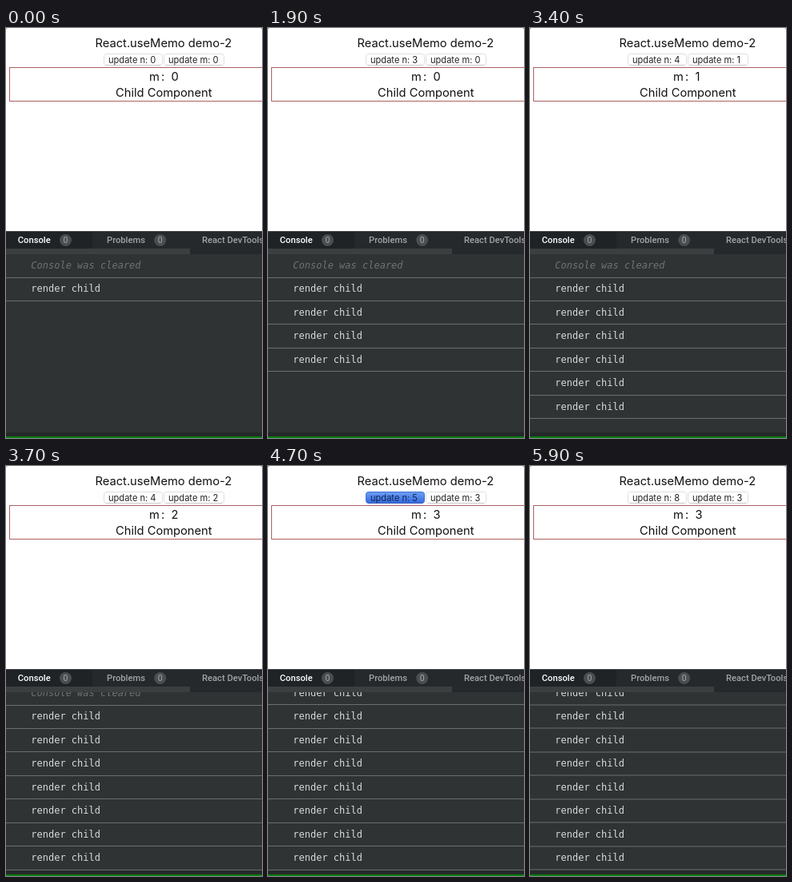
Animation, 320 px wide and 513 px high, one loop 6000 ms. Source, as an HTML page:

```html
<!DOCTYPE html>
<html lang="en">
<head>
<meta charset="utf-8">
<title>useMemo demo</title>
<style>
  html, body { margin: 0; height: 100%; overflow: hidden; background: #fff; }
  svg { display: block; width: 100vw; height: 100vh; }
  text { white-space: pre; }
  .page { font: 14.7px Inter, sans-serif; fill: #111; }
  .button rect { fill: #fff; stroke: #dedede; }
  .button text { font: 11.1px Inter, sans-serif; fill: #222; }
  .button .shade { fill: none; stroke: #c9c9c9; }
  .pressed rect { fill: url(#blue); stroke: #3d6fd0; }
  .pressed text { fill: #10264f; }
  .pressed .shade { stroke: #2f5cb5; }
  .tab { font: 500 11.2px Roboto, sans-serif; fill: #a3a5a6; }
  .tab.active { fill: #fff; }
  .badge { font: 10.5px Roboto, sans-serif; fill: #a5a7a8; text-anchor: middle; }
  .log { font: 12px "DejaVu Sans Mono", monospace; fill: #d9dbdb; }
  .log .cleared { font-style: italic; fill: #707374; }
  .log path { stroke: #6b6e6f; }
</style>
</head>
<body>
<svg viewBox="0 0 320 513" preserveAspectRatio="none">
  <defs>
    <linearGradient id="blue" x2="0" y2="1">
      <stop stop-color="#6c9ff5"/><stop offset="1" stop-color="#3569e0"/>
    </linearGradient>
    <clipPath id="view"><rect y="283" width="320" height="223"/></clipPath>
  </defs>

  <rect width="320" height="20" fill="#aaa"/>
  <rect width="320" height="260" rx="3" fill="#fff"/>
  <g class="page">
    <text x="111.5" y="23.5">React.useMemo demo-2</text>
    <text x="179" y="66">m</text>
    <text x="194" y="66">:</text>
    <text x="206.5" y="66" id="value">0</text>
    <text x="137" y="86">Child Component</text>
  </g>
  <g class="button" id="n">
    <rect x="122.5" y="32.5" width="73" height="14" rx="3"/>
    <path class="shade" d="M125 46.5h68"/>
    <text x="128" y="43.7"></text>
  </g>
  <g class="button" id="m">
    <rect x="197.5" y="32.5" width="75" height="14" rx="3"/>
    <path class="shade" d="M200 46.5h70"/>
    <text x="203" y="43.7"></text>
  </g>
  <rect x="4.5" y="49.5" width="330" height="42" fill="none" stroke="#ad6060"/>

  <rect y="254" width="320" height="259" fill="#2f3334"/>
  <rect y="254" width="320" height="29" fill="#25292c"/>
  <rect y="254" width="108" height="22" fill="#1f2326"/>
  <rect y="254" width="320" height="1" fill="#45494a"/>
  <rect y="276" width="230" height="7" fill="#3b3f40"/>
  <text class="tab active" x="14.8" y="269.3">Console</text>
  <text class="tab" x="126" y="269.3">Problems</text>
  <text class="tab" x="245" y="269.3">React DevTools</text>
  <g fill="#4a4e50"><circle cx="74.5" cy="265.5" r="7.5"/><circle cx="192.7" cy="265.5" r="7.5"/></g>
  <text class="badge" x="74.5" y="269.2">0</text>
  <text class="badge" x="192.7" y="269.2">0</text>

  <g clip-path="url(#view)">
    <g class="log" id="log">
      <text class="cleared" x="31.3" y="301.3">Console was cleared</text>
      <path d="M0 312.5h320"/>
    </g>
  </g>
  <rect y="506" width="320" height="5" fill="#25292a"/>
  <rect y="511" width="320" height="2" fill="#0b7d12"/>
</svg>
<script>
const LOOP = 6000, PRESS = 100, ROW = 29.5, FITTING = 7, FIRST_SCROLL = 13;
const clicks = [
  [1400, 'n'], [1600, 'n'], [1800, 'n'], [2200, 'n'],
  [3200, 'm'], [3500, 'm'], [4000, 'm'],
  [4700, 'n'], [5100, 'n'], [5300, 'n'], [5500, 'n']
];
const get = id => document.getElementById(id);
const log = get('log');

const rows = Array.from({ length: clicks.length + 1 }, (_, i) => {
  const row = document.createElementNS('http://www.w3.org/2000/svg', 'g');
  const y = 330.3 + i * ROW;
  row.innerHTML = `<text x="31.3" y="${y}">render child</text>
    <path d="M0 ${Math.floor(341 + i * ROW) + 0.5}h320"/>`;
  return log.appendChild(row);
});

function draw(now) {
  const t = now % LOOP;
  const past = clicks.filter(([at]) => at <= t);
  const count = key => past.filter(([, k]) => k === key).length;

  for (const key of ['n', 'm']) {
    const button = get(key);
    button.querySelector('text').textContent = `update ${key}: ${count(key)}`;
    button.classList.toggle('pressed', past.some(([at, k]) => k === key && t < at + PRESS));
  }
  get('value').textContent = count('m');

  const renders = past.length + 1;
  rows.forEach((row, i) => row.setAttribute('display', i < renders ? 'inline' : 'none'));
  const scroll = Math.max(0, FIRST_SCROLL + ROW * (renders - FITTING));
  log.setAttribute('transform', `translate(0 ${-scroll})`);
}

function tick() {
  draw(performance.now());
  requestAnimationFrame(tick);
}
tick();
</script>
</body>
</html>
```
